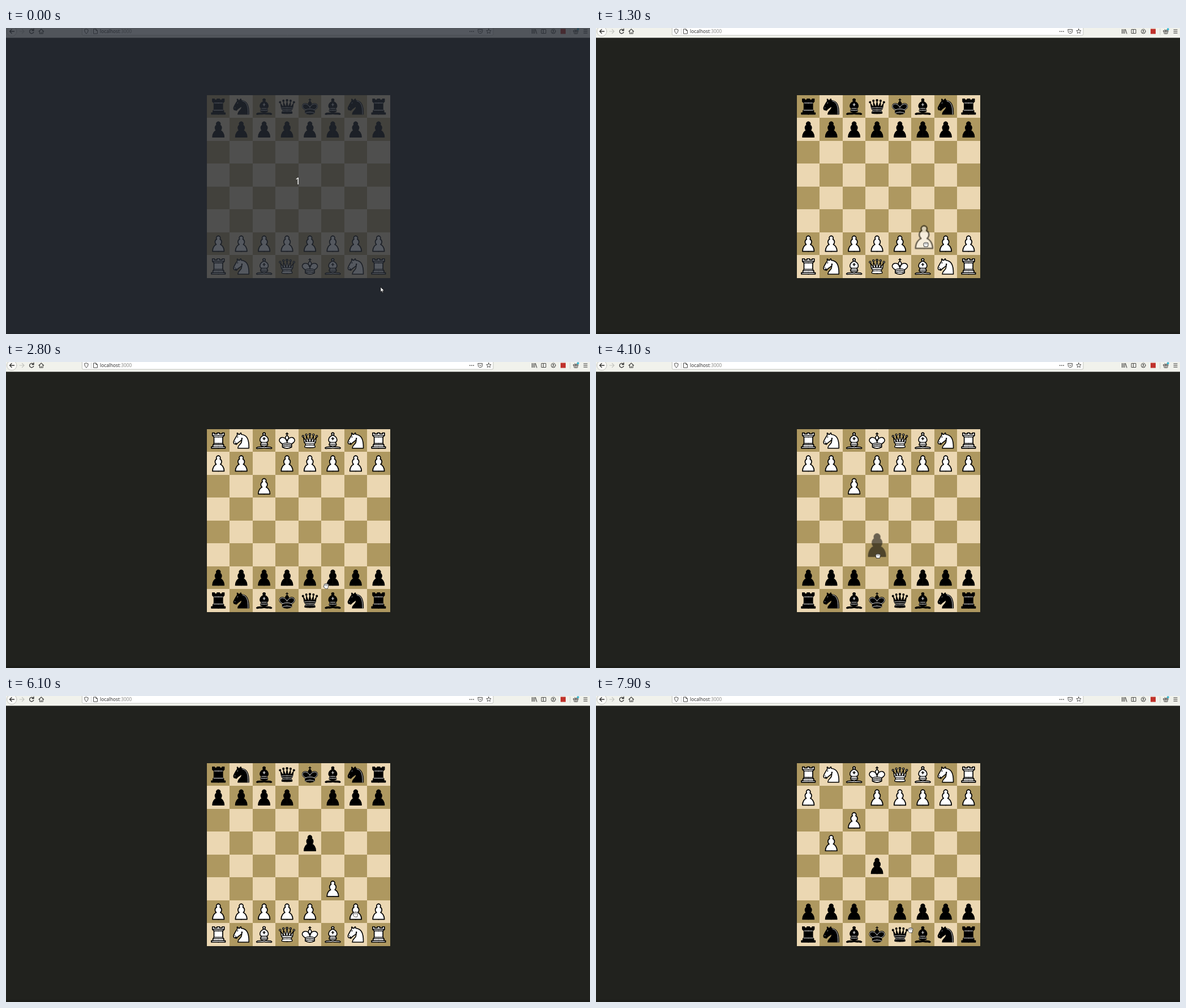
Write an HTML page with a canvas that moves like this. It is 1032 by 542 pixels and loops after 8 s.

```html
<!DOCTYPE html>
<html lang="en">
<head>
<meta charset="utf-8">
<title>Chess board</title>
<style>
html, body { margin: 0; width: 100%; height: 100%; overflow: hidden; background: #21221e; }
canvas { display: block; }
</style>
</head>
<body>
<canvas id="stage" width="1032" height="542"></canvas>
<script>
const stage = document.getElementById('stage').getContext('2d');
const ghost = Object.assign(document.createElement('canvas'), { width: 50, height: 50 }).getContext('2d');
let ctx = stage;

const LOOP = 8000, STEP = 100;
const LEFT = 355, TOP = 119, CELL = 40.45;

const dot = (x, y, r) => `M${x + r} ${y}a${r} ${r} 0 1 1-${2 * r} 0 ${r} ${r} 0 1 1 ${2 * r} 0z`;

// Right half of each piece, mirrored about x = 0; only the knight is drawn whole.
const PIECES = {
  p: { cy: 24.2, size: 32, body: 'M-.3 9h.3c2.2 0 4 1.8 4 4 0 .9-.3 1.7-.8 2.4C5.2 16.500 6.500 18.600 6.500 21c0 2-.9 3.800-2.400 5 3 1.100 7.400 5.600 7.400 13.500H-.3' },
  r: { cy: 24, size: 31.5, body: 'M-.3 9H2.5v2h5V9h4v5l-3 3V29.5l1.5 2.5h.5v4h3v3H-.3',
    lines: 'M0 14h11.5M0 17h8.5M0 29.5h8.5M0 32h10M0 36h10.5', light: 'M0 17h8M0 31h9' },
  b: { cy: 22.2, size: 34.5, body: dot(0, 8, 2.5) + 'M-.3 10.5H0C11 14.5 10.5 24.5 5 26c0 0 2.5 1.5 2.5 4 0 0 .5.5 0 2-1 1.2-4 1.9-7.8 1.9M-.3 34H0c3.4 2.4 10 1 13.5 2 0 0 1.7.5 3 2-.7 1.3-1.7 1.5-3 1-3.4-1-10 .5-13.8-1.2',
    lines: 'M0 26h5M0 30h7.5M0 15.5v5M0 18h2.5' },
  q: { cy: 22.4, size: 38.5, body: dot(0, 7.5, 2) + dot(8.5, 8.5, 2) + dot(16.5, 12, 2) +
    'M-.3 9.5H0l3 15L8.5 11v14l7-11-2 12c0 2-1.5 2-2.5 4-1 1.5-1 1-.5 3.5 1.5 1 1.5 2.5 1.5 2.5 1.5 1.5-.5 2.5-.5 2.5-3 .5-7 .8-11.8.8',
    lines: 'M0 24.8q7 0 13.5 1.2M0 29.2q8 0 11 .8M0 32.7q6 0 10.5.8' },
  k: { cy: 22.8, size: 35.1, body: 'M0 11.6V6M0 8h2.5M-.3 12H0c2 0 3 2.5 3 2.5 1.5 3-3 10.5-3 10.5M-.3 39.6H0c3.6 0 7.2-1 10-2.6v-7s9-4.5 6-10.5c-4-6.5-13.5-3.5-16 4V27',
    lines: 'M0 27.8q6 0 10 2.2M0 31.2q6 0 10 2.3M0 34.7q6 0 10 2.3',
    light: 'M9.5 29.5s8.500-4 6-9.600C11.700 14 2.500 18 0 24.500M0 27.800q6 0 10 2.200M0 34.700q6 0 10 2.300' },
  n: { cx: 22, cy: 23, size: 33.7, body: 'M22 10c10.5 1 16.5 8 16 29H15c0-9 10-6.5 8-21M24 18c.4 2.9-5.5 7.4-8 9-3 2-2.8 4.3-5 4-1-.9 1.4-3 0-3-1 0 .2 1.2-1 2-1 0-4 1-4-4 0-2 6-12 6-12s1.9-1.9 2-3.5c-.7-1-.5-2-.5-3 1-1 3 2.5 3 2.5h2s.8-2 2.5-3c1 0 1 3 1 3',
    lines: 'M9 25.3v.4M14.2 16l.6-1', light: 'M9 25.3v.4M14.2 16l.6-1M24.7 11.3c7 1.3 12.2 8 11.6 27.7' }
};

// A pawn leaves `from` at `start`, is released at `drop`; at `land` it appears and the board turns.
const MOVES = [
  { white: true, col: 5, from: 6, to: 5, start: 1300, drop: 1900, land: 2200, dx: -3, dy: -13 },
  { white: false, col: 4, from: 1, to: 3, start: 3800, drop: 4500, land: 4800, dx: -1.5, dy: -19 },
  { white: true, col: 6, from: 6, to: 4, start: 6500, drop: 7100, land: 7300, dx: -1.5, dy: -19 }
];

// Pointer legs: start, end, and where each one arrives.
const LEGS = [
  [500, 800, 583, 395], [1200, 1500, 582, 350], [2100, 2800, 566, 397], [2800, 3500, 496, 388],
  [3700, 4330, 499, 324], [5100, 5400, 563, 405], [5500, 5950, 638, 389], [5950, 6100, 618, 387],
  [6400, 6900, 618, 316], [7200, 7900, 556, 415]
];

function pointerAt(t) {
  let x = 631, y = 439;
  for (const [start, end, toX, toY] of LEGS) {
    const k = Math.min(1, Math.max(0, (t - start) / (end - start)));
    const eased = k * k * (3 - 2 * k);
    x += (toX - x) * eased;
    y += (toY - y) * eased;
  }
  return [x, y];
}

function rect(x, y, w, h, color) {
  ctx.fillStyle = color;
  ctx.fillRect(x, y, w, h);
}

function shape(d, stroke, width = 1, fill) {
  const path = new Path2D(d);
  if (fill) { ctx.fillStyle = fill; ctx.fill(path); }
  if (stroke) { ctx.strokeStyle = stroke; ctx.lineWidth = width; ctx.stroke(path); }
}

function text(str, x, y, size, color) {
  ctx.font = `${size}px "Noto Sans", sans-serif`;
  ctx.fillStyle = color;
  ctx.fillText(str, x, y);
  return x + ctx.measureText(str).width;
}

function drawPiece(kind, white, x, y, size = 28.6) {
  const { cx = 0, cy, size: span, body, lines = '', light = lines } = PIECES[kind];
  const scale = size / span;
  const sides = cx ? [1] : [1, -1];
  const layer = (d, ...style) => {
    for (const side of sides) {
      ctx.save();
      ctx.translate(x, y);
      ctx.scale(side * scale, scale);
      ctx.translate(-cx, -cy);
      shape(d, ...style);
      ctx.restore();
    }
  };
  layer(body, '#000', white ? 1.9 : 1.5, white ? '#fff' : '#000');
  layer(white ? lines : light, white ? '#000' : '#ececec', white ? 1.6 : 1.1);
}

function drawToolbar() {
  const ink = '#4a4a48', pale = '#c4c5c0';
  rect(0, 0, 1032, 17, '#f1f2ec');
  rect(0, 17, 1032, .4, pale);
  shape('M134.5-2V11q0 2 2 2H859q2 0 2-2V-2z', pale, 1, '#fff');
  shape(dot(10.3, 6, 8.7), pale, 1, '#fafaf7');
  shape('M14.5 6h-8M10 2.5L6.5 6 10 9.5', '#333', 1.3);
  shape('M24 6h8M28.5 2.5L32 6l-3.5 3.5', pale, 1.2);
  shape('M48 3.5a3.7 3.7 0 1 0 .8 3.8M49 1.5v3h-3', '#333', 1.3);
  shape('M58 6l4.3-4 4.3 4M59.5 5.5V10h5.6V5.5M62.3 10V7.5', ink, 1.2);
  shape('M142 2l3.3 1.2q0 5-3.3 7-3.3-2-3.3-7z', ink);
  rect(150, 1, .8, 10, pale);
  shape('M155 2h4l2.5 2.5V10H155zM159 2v2.5h2.5', ink);
  text(':3000', text('localhost', 166, 9, 8.3, '#333'), 9, 8.3, '#8b8b88');
  for (let i = 0; i < 3; i++) {
    rect(819 + i * 3.2, 5.3, 1.6, 1.6, ink);
    rect(929 + i * 2.3, 2, 1.1, 8, ink);
    rect(1020.5, 2.5 + i * 3, 7, 1.1, ink);
  }
  shape('M835.5 2.5', ink);
  shape('M834.3 2.5h7.5v3.3a3.7 3.7 0 0 1-7.5 0zM836.3 5l1.8 1.7L840 5', ink);
  let star = 'M';
  for (let i = 0; i < 10; i++) {
    const angle = i * Math.PI / 5, r = i % 2 ? 2 : 4.4;
    star += `${i ? 'L' : ''}${853 + r * Math.sin(angle)} ${6 - r * Math.cos(angle)}`;
  }
  shape(star + 'z', ink, .9);
  shape('M935.6 2.5L938 10', ink, 1.1);
  shape('M946.5 2.5h7.5v7h-7.5zM949.5 2.500v7', ink);
  shape(dot(967.2, 6, 3.8) + 'M965 8.5q2.2-2.5 4.4 0', ink);
  shape(dot(967.2, 5, 1.3), null, 0, ink);
  rect(980, 1.5, 9, 9, '#c0322c');
  rect(996.5, 1, .8, 11, pale);
  shape('M1003 4.5h8v2h-8zM1004 6.5V10h6V6.5M1007 10V4.5l-2-2M1007 4.5l2-2', ink);
  shape(dot(1010.8, 2.2, 1.9), null, 0, '#32b7d2');
}

function drawBoard(t) {
  const flipped = MOVES.filter(m => t >= m.land).length % 2 === 1;
  const edge = i => Math.round(i * CELL);
  const centre = i => ((flipped ? 7 - i : i) + .5) * CELL;
  const put = (kind, white, col, row) => drawPiece(kind, white, LEFT + centre(col), TOP + centre(row));
  for (let i = 0; i < 64; i++) {
    const col = i % 8, row = i >> 3, x = edge(col), y = edge(row);
    rect(LEFT + x, TOP + y, edge(col + 1) - x, edge(row + 1) - y, (col + row) % 2 ? '#ebd7b2' : '#ae9860');
  }
  for (let col = 0; col < 8; col++) {
    for (const white of [false, true]) {
      const move = MOVES.find(m => m.col === col && m.white === white);
      put('rnbqkbnr'[col], white, col, white ? 7 : 0);
      if (!move || t < move.start) put('p', white, col, white ? 6 : 1);
      else if (t >= move.land) put('p', white, col, move.to);
    }
  }
}

function drawHand(x, y, closed) {
  ctx.save();
  ctx.translate(x, y);
  if (closed) {
    shape('M-4-.5q0-2.5 2-2.5 1-1 2 0 1-1 2 0 2.5-.5 2.5 2L3.5 4h-6z', '#222', .9, '#fff');
    shape('M-1.5-2v1.7M.5-2v1.7M2.5-1.700v1.500', '#222', .6);
  } else {
    let fingers = 'M-2 2.5L-4 .5';
    for (let i = -1.5; i < 2; i++) fingers += `M${i * 1.5} 1L${i * 2}${-4.3 + Math.abs(i)}`;
    const palm = 'M-2.5.5h5L2 3.8h-3.5z';
    shape(fingers, '#222', 2.6);
    shape(palm, '#222', 2);
    shape(fingers, '#fff', 1.3);
    shape(palm, '#fff', .7, '#fff');
  }
  ctx.restore();
}

// The dragged pawn is drawn opaque on its own layer, then faded as one.
function drawGhost(white, x, y) {
  ctx = ghost;
  ctx.clearRect(0, 0, 50, 50);
  drawPiece('p', white, 25, 25, 42);
  ctx = stage;
  ctx.globalAlpha = .55;
  ctx.drawImage(ghost.canvas, x - 25, y - 25);
  ctx.globalAlpha = 1;
}

function draw(t) {
  rect(0, 0, 1032, 542, '#21221e');
  rect(0, 538, 1032, 4, '#1c1d19');
  drawToolbar();
  drawBoard(t);
  if (t < 400) {
    rect(0, 0, 1032, 542, 'rgba(36,42,51,.78)');
    text('1', 511, 277, 16.5, '#fff');
    shape('M662 459v8.5l2-1.8 1.3 2.9 1.4-.7-1.3-2.7h2.7z', '#111', .7, '#fff');
    return;
  }
  const [x, y] = pointerAt(t);
  const drag = MOVES.find(m => t >= m.start && t < m.drop);
  if (drag) drawGhost(drag.white, x + drag.dx, y + drag.dy);
  drawHand(x, y, drag);
}

for (const c of [stage, ghost]) c.lineCap = c.lineJoin = 'round';

const began = performance.now();
function tick() {
  const t = (performance.now() - began) % LOOP;
  draw(Math.floor(t / STEP) * STEP);
  requestAnimationFrame(tick);
}
tick();
</script>
</body>
</html>
```
